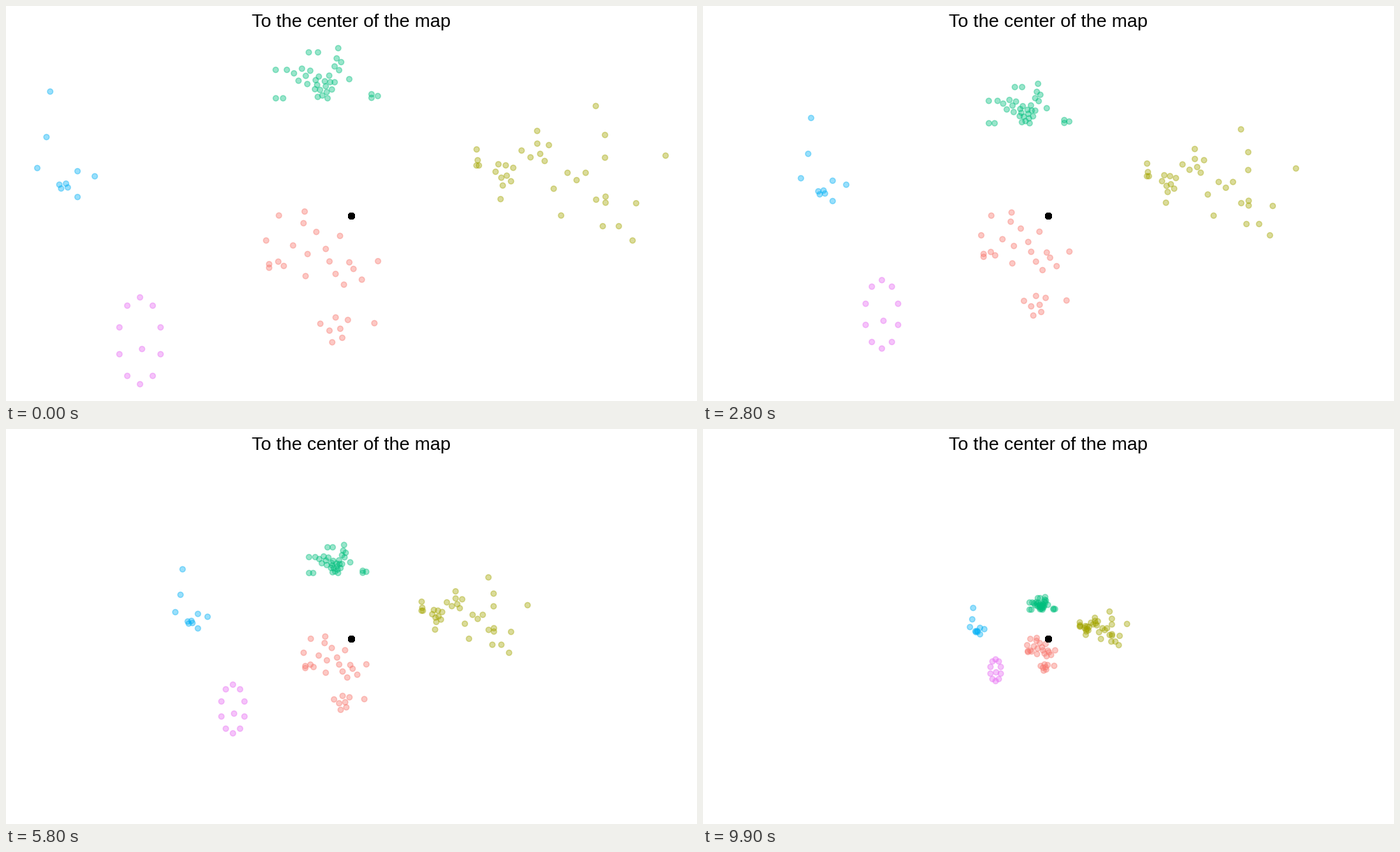
Animation, 990 px wide and 566 px high, one loop 10000 ms. Source, as a matplotlib script:

```python
import numpy as np
import matplotlib.pyplot as plt
from matplotlib.animation import FuncAnimation
from matplotlib.colors import to_rgba

W, H, DPI = 990, 566, 100
PT = 72 / DPI                  # points per pixel
FRAMES, INTERVAL = 100, 100
CENTER = np.array([495, 301])
END_SCALE = 0.25
DIAMETER, EDGE = 7.82, 1.42    # marker size in pixels
GOLDEN = np.pi * (3 - np.sqrt(5))

rng = np.random.default_rng(4)


def ring(cx, cy, rx, ry, n, phase=0):
    """n dots evenly spaced on an ellipse."""
    a = np.radians(phase) + np.arange(n) * 2 * np.pi / n
    return np.column_stack([cx + rx * np.cos(a), cy + ry * np.sin(a)])


def cloud(cx, cy, rx, ry, n):
    """n dots loosely filling an ellipse."""
    k = np.arange(n)
    r = np.sqrt((k + 0.5) / n)
    unit = np.column_stack([r * np.cos(k * GOLDEN), r * np.sin(k * GOLDEN)])
    unit += rng.uniform(-0.12, 0.12, unit.shape)
    return [cx, cy] + [rx, ry] * unit


# Each cluster: a few outlying dots, then small rings and clouds.
clusters = {
    "#F8766D": [
        [(372.7, 336), (391, 300.2), (427.9, 294.5), (533, 365.6),
         (527.8, 454.5)],
        ring(384, 372.5, 14, 3, 3),
        ring(491, 388, 20, 12, 4, 20),
        cloud(441, 348, 52, 46, 10),
        cloud(471, 460, 25, 23, 7),
    ],
    "#A3A500": [
        [(674.3, 205.5), (708.6, 276.7), (761, 179), (784.7, 261.8),
         (795.3, 300.2), (845, 143.3), (858.2, 184.8), (858.2, 217.3),
         (945, 214.4), (902.8, 282.6), (897.7, 336)],
        ring(675.8, 226, 2, 5, 3, -90),
        ring(817.5, 242.5, 15, 7, 3, 90),
        ring(854.5, 277.5, 9, 5, 3, 180),
        ring(866.5, 315.5, 11.5, 2, 2),
        cloud(760, 210, 23, 18, 6),
        cloud(714, 241, 19, 19, 8),
    ],
    "#00BF7D": [
        [(476, 60.4), (491.8, 104.8)],
        ring(440.4, 66.4, 6.6, 0, 2),
        ring(394.4, 91.5, 8, 0, 2),
        ring(391.8, 132.2, 5.2, 0, 2),
        ring(526.7, 129, 6, 3, 3),
        ring(475.5, 83.5, 5, 9, 4, 70),
        cloud(424.5, 100.5, 13, 16, 6),
        cloud(456, 115, 18, 20, 15),
    ],
    "#00B0F6": [
        [(63.3, 122.6), (58, 187.8), (44.8, 232.2), (127.2, 244)],
        ring(102.5, 255.2, 0, 18.5, 2, 90),
        ring(82.5, 258, 7, 4, 4, 30),
    ],
    "#E76BF3": [
        [(194.9, 491.5)],
        ring(192, 479.7, 31, 62.2, 10, 90),
    ],
}
dots = np.vstack([part for parts in clusters.values() for part in parts])
colors = [to_rgba(c, 0.4)
          for c, parts in clusters.items() for part in parts for _ in part]

# One black dot per coloured dot, all stacked on the centre.
start = np.vstack([dots, np.tile(CENTER, (len(dots), 1))])
colors += [to_rgba("black")] * len(dots)

fig = plt.figure(figsize=(W / DPI, H / DPI), dpi=DPI, facecolor="white")
ax = fig.add_axes([0, 0, 1, 1])
ax.set(xlim=(0, W), ylim=(H, 0))
ax.axis("off")

points = ax.scatter(*start.T, s=(DIAMETER * PT) ** 2, linewidths=EDGE * PT,
                    facecolors=colors, edgecolors=colors)
ax.text(W / 2, 30, "To the center of the map", family="Liberation Sans",
        size=26.4 * PT, color="black", ha="center", va="baseline")


def update(i):
    scale = 1 - (1 - END_SCALE) * i / (FRAMES - 1)
    points.set_offsets(CENTER + scale * (start - CENTER))
    return points,


anim = FuncAnimation(fig, update, frames=FRAMES, interval=INTERVAL,
                     repeat=True, repeat_delay=0)
plt.show()
```
